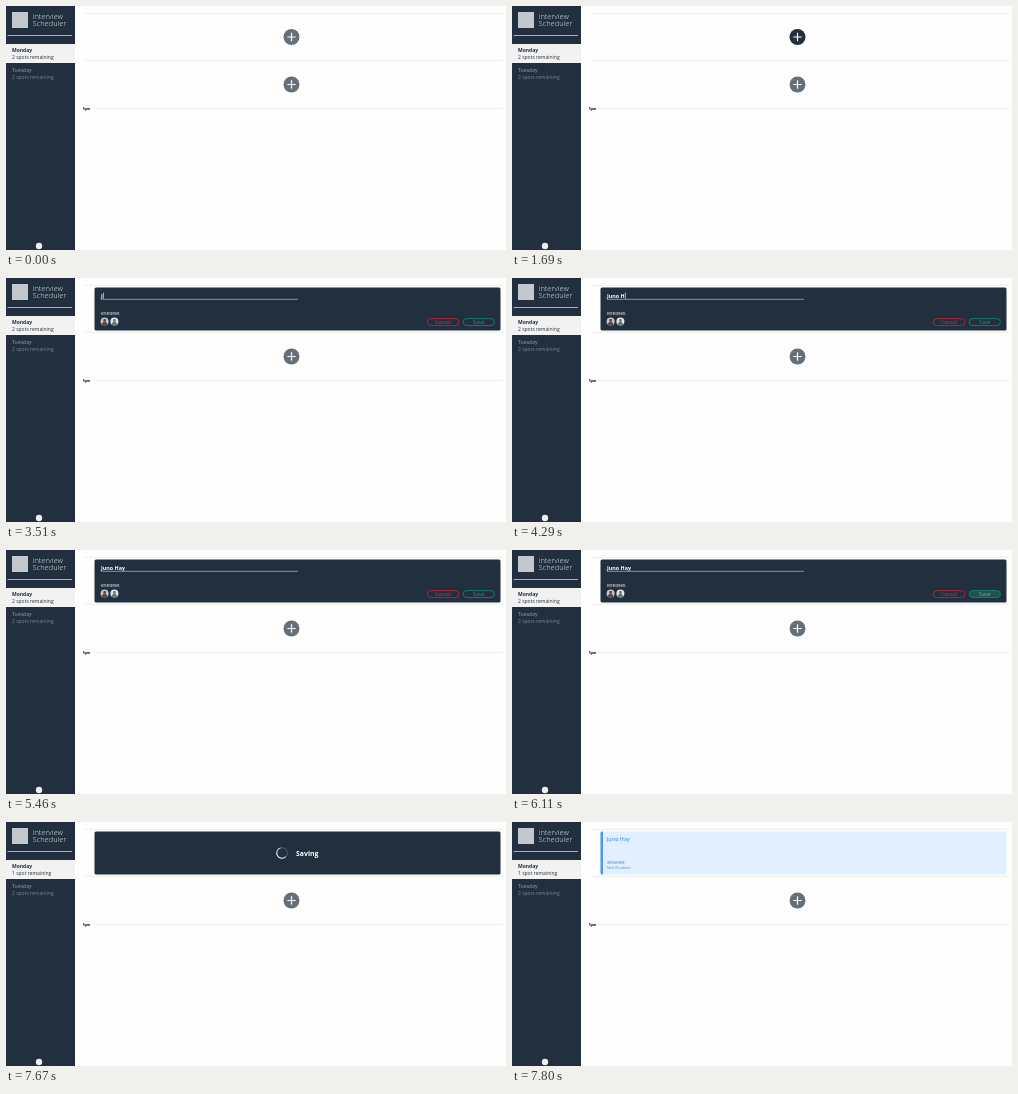
Write an HTML page that moves like this. It is 500x244 px and loops after 8000 ms.

```html
<!DOCTYPE html>
<html lang="en">
<head>
<meta charset="utf-8">
<title>Interview Scheduler</title>
<style>
  html, body { margin: 0; width: 100%; height: 100%; overflow: hidden; background: #fefefe; }
  svg { display: block; width: 100%; height: 100%; }
  text { font-family: "Open Sans", "Noto Sans", sans-serif; font-size: 5px; white-space: pre; }
  .bold { font-weight: 700; }
  .semi { font-weight: 600; }
  .title { font-size: 7.5px; font-weight: 300; fill: #e9ecef; }
  .dim { fill: #7d8791; }
  .name { font-size: 5.4px; }
  .label { font-size: 2.7px; font-weight: 600; }
  .button { font-size: 5.3px; text-anchor: middle; }
  .rule { stroke: #e6e6e6; stroke-width: .7; }
</style>
</head>
<body>
<svg viewBox="0 0 500 244" preserveAspectRatio="none">
  <defs>
    <path id="plus" d="M-4.2 0H4.2M0 -4.2V4.2" stroke="#fff" stroke-width="1.2"/>
    <path id="bust" d="M-2.6 3A2.6 2.8 0 0 1 2.6 3A4 4 0 0 1 -2.6 3ZM-1.5 -1.3a1.5 1.5 0 1 0 3 0a1.5 1.5 0 1 0 -3 0"/>
  </defs>

  <!-- Sidebar -->
  <rect width="69" height="244" fill="#222f3e"/>
  <rect x="6" y="6" width="16" height="16" fill="#c3c8ce"/>
  <text class="title" x="26.5" y="13">Interview</text>
  <text class="title" x="26.5" y="20">Scheduler</text>
  <path d="M1.5 29.5H66" stroke="#c9ced3" stroke-width=".8"/>
  <rect y="38" width="69" height="19" fill="#f2f2f2"/>
  <text class="bold" x="6" y="46" fill="#222f3e">Monday</text>
  <text id="spots" x="6" y="53" fill="#222f3e"></text>
  <text class="dim semi" x="6" y="66">Tuesday</text>
  <text class="dim" x="6" y="72.7">2 spots remaining</text>
  <circle cx="33" cy="240" r="3.2" fill="#eceef0"/>

  <!-- Schedule -->
  <path class="rule" d="M79 7.3H497M79 54.3H497M85 102.3H497"/>
  <text class="bold" x="77" y="103.6" style="font-size:3.3px">5pm</text>
  <g transform="translate(285.5 78.5)"><circle r="8" fill="#667079"/><use href="#plus"/></g>
  <g id="add" transform="translate(285.5 31)"><circle id="addDisc" r="8"/><use href="#plus"/></g>

  <rect id="panel" x="88.5" y="9.5" width="406" height="43" rx="1.5" fill="#222f3e"/>

  <g id="form">
    <text id="hint" class="name" x="95" y="19.7" fill="#929aa3">Enter Student Name</text>
    <text id="typed" class="name bold" x="95" y="19.7" fill="#fff"></text>
    <rect id="caret" y="14.6" width=".6" height="6" fill="#fff"/>
    <path d="M95 21.3H292" stroke="#b9bfc6" stroke-width=".7"/>
    <text class="label" x="94.7" y="36.5" fill="#dfe2e5">INTERVIEWERS</text>
    <g transform="translate(98.6 43.5)">
      <circle r="4" fill="#c8c5c3"/><use href="#bust" fill="#554a4a"/>
    </g>
    <g transform="translate(108.4 43.5)">
      <circle r="4" fill="#e4e8e8"/><use href="#bust" fill="#69767b"/>
    </g>
    <rect x="421.3" y="40.6" width="31.6" height="7" rx="3.5" fill="none" stroke="#d8283f" stroke-width=".7"/>
    <text class="button" x="437.2" y="46" fill="#d8283f">Cancel</text>
    <rect id="saveBox" x="457.2" y="40.6" width="31.2" height="7" rx="3.5" fill="#159a76" stroke="#159a76" stroke-width=".7"/>
    <text id="saveText" class="button" x="472.8" y="46">Save</text>
  </g>

  <g id="saving">
    <g transform="translate(276 31)" fill="none">
      <circle r="5.3" stroke="#59636f" stroke-width=".9"/>
      <path id="spinner" d="M1.5 -5.08A5.3 5.3 0 1 0 1.5 5.08" stroke="#eef0f2" stroke-width=".9"/>
    </g>
    <text class="bold" x="290" y="33.5" fill="#fff" style="font-size:6.9px">Saving</text>
  </g>

  <g id="booked" fill="#4c9af0">
    <rect x="88.5" y="9.5" width="406" height="43" rx="1.5" fill="#e1effe"/>
    <path d="M91 9.5V52.5H90a1.5 1.5 0 0 1 -1.5 -1.5V11a1.5 1.5 0 0 1 1.5 -1.5Z"/>
    <text id="student" class="name semi" x="94.7" y="19.3"></text>
    <text class="label" x="95" y="41.6">INTERVIEWER</text>
    <text x="95" y="46.7" style="font-size:4px">Nell Brodwin</text>
  </g>
</svg>
<script>
const LOOP = 8000, STEP = 130;
const OPEN = 1820, SAVE = 6760, DONE = 7800;
const NAME = "Juno Hay";
const KEYS = [3510, 3640, 3900, 4030, 4160, 4290, 4420, 4680];

const $ = id => document.getElementById(id);
const show = (id, on) => $(id).style.display = on ? "" : "none";
const within = (t, a, b) => t >= a && t < b;
const ramp = (t, a, b) => Math.min(1, Math.max(0, (t - a) / (b - a)));
const mix = (a, b, p) => `rgb(${a.map((v, i) => Math.round(v + (b[i] - v) * p))})`;

$("student").textContent = NAME;

function draw(t) {
  $("spots").textContent = t < SAVE ? "2 spots remaining" : "1 spot remaining";
  show("add", t < OPEN);
  show("panel", within(t, OPEN, DONE));
  show("form", within(t, OPEN, SAVE));
  show("saving", within(t, SAVE, DONE));
  show("booked", t >= DONE);

  $("addDisc").setAttribute("fill", mix([102, 112, 121], [34, 47, 62], ramp(t, 1170, 1690)));

  const count = KEYS.filter(k => t >= k).length;
  $("typed").textContent = NAME.slice(0, count);
  show("hint", !count);
  show("caret", within(t, 2600, 3120) || within(t, KEYS[0], 5200));
  if (within(t, OPEN, SAVE)) {
    $("caret").setAttribute("x", 95.2 + (count ? $("typed").getComputedTextLength() : 0));
  }

  const hover = ramp(t, 5980, 6370);
  $("saveBox").setAttribute("fill-opacity", hover);
  $("saveText").setAttribute("fill", mix([21, 154, 118], [255, 255, 255], hover));

  $("spinner").setAttribute("transform", `rotate(${(t - SAVE) * 0.36})`);
}

function frame(now) {
  const t = now % LOOP;
  draw(Math.floor(t / STEP) * STEP);
  requestAnimationFrame(frame);
}
draw(0);
requestAnimationFrame(frame);
</script>
</body>
</html>
```
